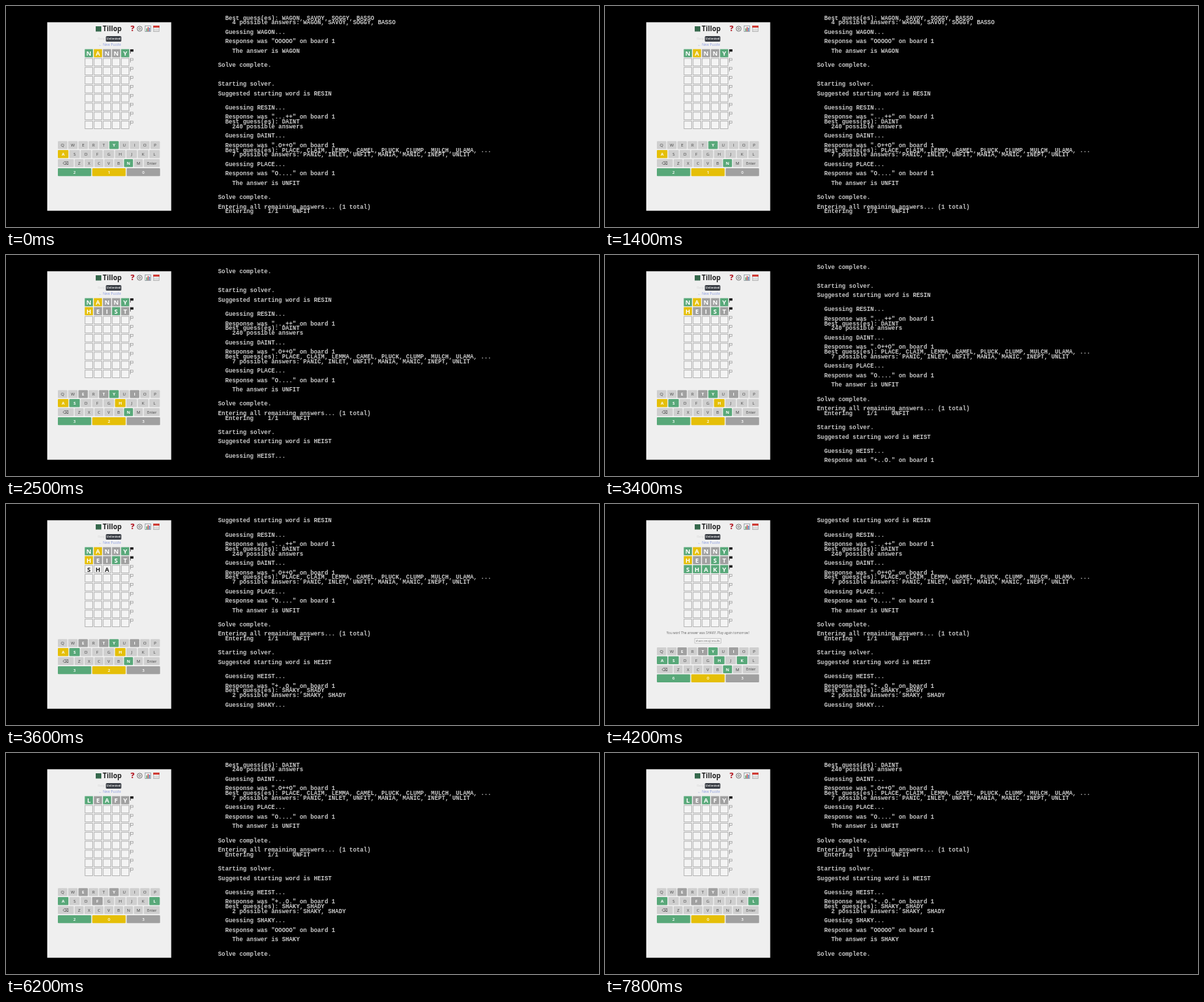
An HTML page with a canvas that plays this animation: 846x316 px, repeating every 8000 ms.

```html
<!DOCTYPE html>
<html lang="en">
<head>
<meta charset="utf-8">
<title>Word puzzle solver</title>
<style>
html, body { margin: 0; width: 100%; height: 100%; overflow: hidden; background: #000; }
canvas { display: block; }
</style>
</head>
<body>
<canvas id="stage" width="846" height="316"></canvas>
<script>
const ctx = document.getElementById('stage').getContext('2d');
const LOOP = 8000;
const SANS = '"Open Sans", "Noto Sans", sans-serif';
const MONO = '"Liberation Mono", monospace';
const COLOR = { g: '#58a879', y: '#e5bf08', x: '#a0a0a0', none: '#cfcfcf' };
const RANK = 'xyg'; // grey, yellow, green

// Terminal log: [half-line row, indent, text]
const log = [
  [0, 2, 'Best guess(es): WAGON, SAVOY, SOGGY, BASSO'],
  [1, 4, '4 possible answers: WAGON, SAVOY, SOGGY, BASSO'],
  [3, 2, 'Guessing WAGON...'],
  [5, 2, 'Response was "OOOOO" on board 1'],
  [7, 4, 'The answer is WAGON'],
  [10, 0, 'Solve complete.'],
  [14, 0, 'Starting solver.'],
  [16, 0, 'Suggested starting word is RESIN'],
  [19, 2, 'Guessing RESIN...'],
  [21, 2, 'Response was "...++" on board 1'],
  [22, 2, 'Best guess(es): DAINT'],
  [23, 4, '240 possible answers'],
  [25, 2, 'Guessing DAINT...'],
  [27, 2, 'Response was ".O++O" on board 1'],
  [28, 2, 'Best guess(es): PLACE, CLAIM, LEMMA, CAMEL, PLUCK, CLUMP, MULCH, ULAMA, ...'],
  [29, 4, '7 possible answers: PANIC, INLET, UNFIT, MANIA, MANIC, INEPT, UNLIT'],
  [31, 2, 'Guessing PLACE...'],
  [33, 2, 'Response was "O...." on board 1'],
  [35, 4, 'The answer is UNFIT'],
  [38, 0, 'Solve complete.'],
  [40, 0, 'Entering all remaining answers... (1 total)'],
  [41, 2, 'Entering    1/1    UNFIT'],
  [44, 0, 'Starting solver.'],
  [46, 0, 'Suggested starting word is HEIST'],
  [49, 2, 'Guessing HEIST...'],
  [51, 2, 'Response was "+..O." on board 1'],
  [52, 2, 'Best guess(es): SHAKY, SHADY'],
  [53, 4, '2 possible answers: SHAKY, SHADY'],
  [55, 2, 'Guessing SHAKY...'],
  [57, 2, 'Response was "OOOOO" on board 1'],
  [59, 4, 'The answer is SHAKY'],
  [62, 0, 'Solve complete.']
];
// [time, first visible row, last printed row]
const scrolls = [[0, 0, 41], [1600, 9, 49], [2900, 10, 51], [3500, 15, 55], [5100, 22, 62]];

const RESET = 5500, WON = 3900;
const firstGame = [
  { word: 'NANNY', marks: 'gyxxg', typed: -1000, shown: 0 },
  { word: 'HEIST', marks: 'yxxgx', typed: 1600, shown: 2100 },
  { word: 'SHAKY', marks: 'ggggg', typed: 3500, shown: WON }
];
const secondGame = [{ word: 'LEAFY', marks: 'gxgxx', typed: RESET - 1000, shown: RESET }];

function rect(x, y, w, h, fill, radius = 0) {
  ctx.fillStyle = fill;
  ctx.beginPath();
  ctx.roundRect(x, y, w, h, radius);
  ctx.fill();
}

function label(text, x, y, size, fill, weight = 400, align = 'center') {
  ctx.font = `${weight} ${size}px ${SANS}`;
  ctx.textAlign = align;
  ctx.fillStyle = fill;
  ctx.fillText(text, x, y + size * 0.357); // y is the middle of the capitals
}

function outline(x, y, w, h, stroke, width = 1) {
  ctx.strokeStyle = stroke;
  ctx.lineWidth = width;
  ctx.strokeRect(x, y, w, h);
}

function drawTerminal(t) {
  const [, top, last] = scrolls.findLast(s => t >= s[0]);
  ctx.font = `bold 8.45px ${MONO}`;
  ctx.textAlign = 'left';
  ctx.fillStyle = '#c8c8c8';
  for (const [row, indent, text] of log)
    if (row >= top && row <= last)
      ctx.fillText(text, 302.5 + indent * 5.07, 19.7 + (row - top) * 6.745);
}

function drawHeader() {
  rect(128, 29, 8, 7.5, '#35684c');
  label('Tillop', 138, 32.6, 9.8, '#222', 700, 'left');

  label('?', 180.5, 32.5, 11, '#b5222c', 800);
  ctx.strokeStyle = '#777';
  ctx.lineWidth = 1;
  for (const radius of [3.6, 1.3]) {
    ctx.beginPath();
    ctx.arc(190.7, 32.5, radius, 0, 7);
    ctx.stroke();
  }
  rect(198.5, 28.5, 8, 8, '#fff');
  outline(198.5, 28.5, 8, 8, '#8b949c', 0.8);
  rect(200, 32, 1.4, 4, '#4a9b62');
  rect(202, 30, 1.4, 6, '#c04a4a');
  rect(204, 31, 1.4, 5, '#4878b8');
  rect(210.5, 28.5, 8, 8, '#fff');
  outline(210.5, 28.5, 8, 8, '#aaa', 0.8);
  rect(210, 28, 9, 3, '#cf3e37');
  for (let i = 0; i < 6; i++) rect(211.7 + i % 3 * 2.2, 32.2 + (i > 2 ? 2 : 0), 1.2, 1.2, '#999');

  label('Daily', 136, 47, 4.2, '#d0d0d0');
  rect(142.5, 43, 22, 8, '#3c4047', 1.5);
  label('Unlimited', 153.5, 47, 4.2, '#fff', 600);
  label('← New Puzzle', 148, 55.7, 4.9, '#8f9fe0');
}

function drawFlag(y, filled) {
  rect(177.2, y - 5.6, 0.7, 6, filled ? '#333' : '#888');
  if (filled) rect(177.4, y - 5.6, 4.4, 3.4, '#1a1a1a');
  else outline(177.6, y - 5.3, 3.6, 2.8, '#999', 0.7);
}

function drawBoard(t, game) {
  for (let row = 0; row < 9; row++) {
    const y = 67.5 + row * 12.82;
    const guess = game[row];
    const shown = guess && t >= guess.shown;
    for (let col = 0; col < 5; col++) {
      const x = 118.2 + col * 12.95;
      if (shown) {
        rect(x - 5.8, y - 5.8, 11.6, 11.6, COLOR[guess.marks[col]]);
      } else {
        rect(x - 5.4, y - 5.4, 10.8, 10.8, '#f4f4f4');
        outline(x - 5.4, y - 5.4, 10.8, 10.8, '#b0b0b0', 0.9);
      }
      if (guess && t >= guess.typed + col * 50)
        label(guess.word[col], x, y + 0.4, 9, shown ? '#fff' : '#222', 700);
    }
    drawFlag(y, shown);
  }
}

// Best mark so far for each guessed letter
function letterMarks(t, game) {
  const best = {};
  for (const { word, marks, shown } of game)
    if (t >= shown)
      [...word].forEach((letter, i) => {
        if (RANK.indexOf(marks[i]) > RANK.indexOf(best[letter])) best[letter] = marks[i];
      });
  return best;
}

function drawKeyboard(marks, top) {
  const key = (text, x, y, w) => {
    const mark = marks[text];
    rect(x, y, w, 11.3, COLOR[mark || 'none'], 1);
    label(text, x + w / 2, y + 5.8, text.length > 1 ? 5.4 : 6, mark ? '#fff' : '#444', mark ? 700 : 400);
  };
  const keys = (letters, x, y, pitch) =>
    [...letters].forEach((c, i) => key(c, x + i * pitch, y, pitch - 1.3));

  keys('QWERTYUIOP', 74, top, 14.68);
  keys('ASDFGHJKL', 74, top + 12.9, 16.3);
  key('⌫', 74, top + 25.8, 22.7);
  keys('ZXCVBNM', 98, top + 25.8, 14.08);
  key('Enter', 196.6, top + 25.8, 22.7);

  [...'gyx'].forEach((mark, i) => {
    const count = Object.values(marks).filter(m => m === mark).length;
    const x = 74 + i * 49.1;
    rect(x, top + 38.7, 47.6, 11.3, COLOR[mark], 1);
    label(count, x + 23.8, top + 44.4, 6, '#fff', 600);
  });
}

function drawPage(t) {
  rect(58.8, 23.3, 176.9, 269.4, '#efefef');
  drawHeader();
  const game = t < RESET ? firstGame : secondGame;
  const won = t >= WON && t < RESET;
  drawBoard(t, game);
  if (won) {
    label('You won! The answer was SHAKY. Play again tomorrow!', 146.7, 184.8, 4.6, '#666');
    rect(128, 192.2, 37.5, 6.8, '#f6f6f6', 1);
    outline(128, 192.2, 37.5, 6.8, '#aaa', 0.6);
    label('share emoji results', 146.7, 195.5, 3.9, '#555');
  }
  drawKeyboard(letterMarks(t, game), won ? 204.9 : 193.2);
}

function frame(now) {
  const t = now % LOOP;
  rect(0, 0, 846, 316, '#000');
  drawTerminal(t);
  drawPage(t);
  requestAnimationFrame(frame);
}
requestAnimationFrame(frame);
</script>
</body>
</html>
```
